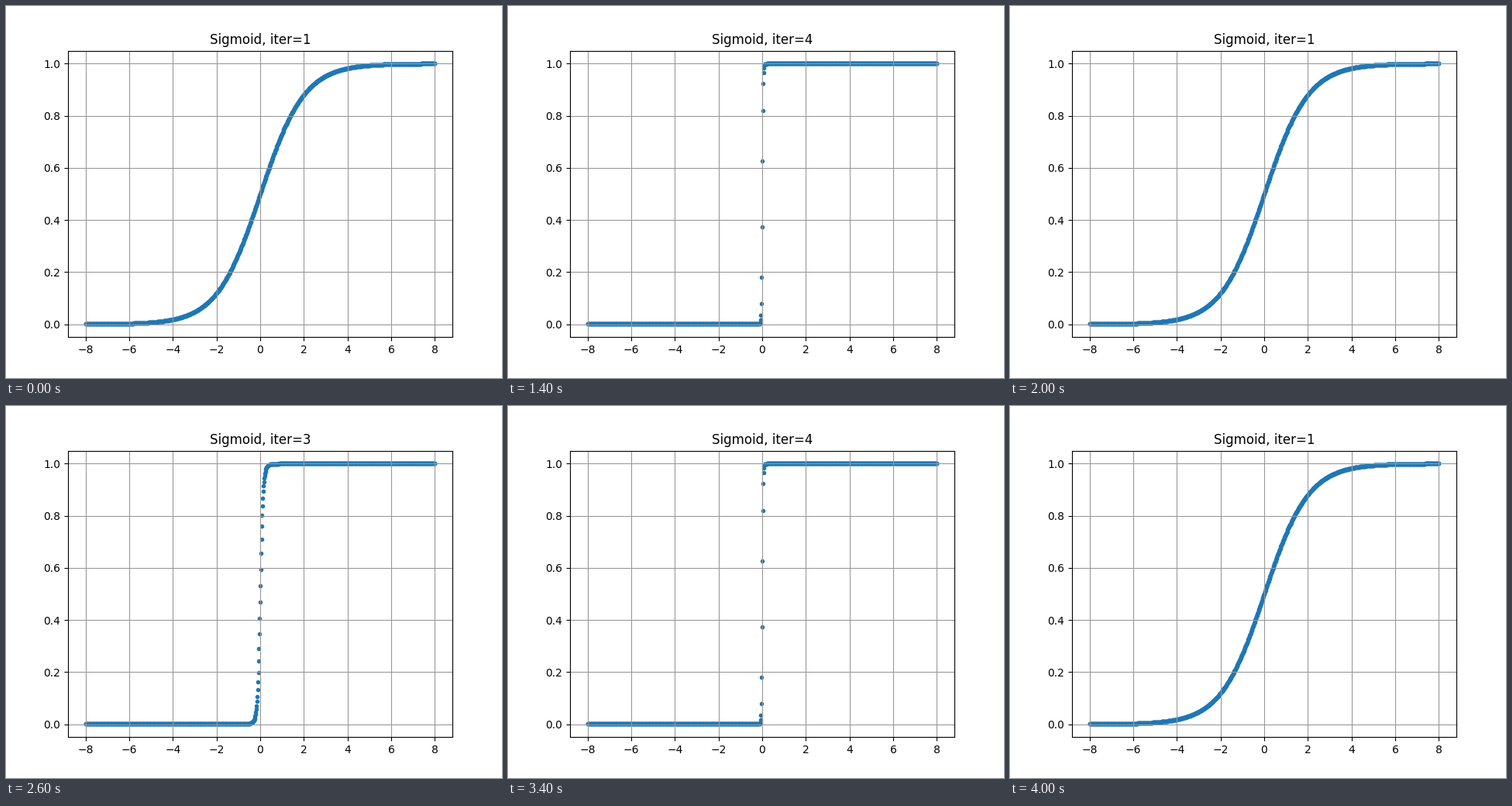
Animation, 640 px wide and 480 px high, one loop 4200 ms. Source, as a matplotlib script:

```python
import matplotlib.pyplot as plt
import numpy as np
from matplotlib.animation import FuncAnimation

SPAN = 8
LEVELS = 5
FRAMES = 21
STEP_MS = 200


def sigmoid(x):
    return 1 / (1 + np.exp(-x))


def iterate(x, count):
    """Apply the sigmoid repeatedly, stretching each result back to the span."""
    y = sigmoid(x)
    for _ in range(count - 1):
        y = sigmoid(2 * SPAN * y - SPAN)
    return y


def level_at(step):
    """Bounce between the first and last level, holding each end twice."""
    phase = step % (2 * LEVELS)
    if phase == 0:
        return 1
    return phase if phase <= LEVELS else 2 * LEVELS + 1 - phase


x = np.linspace(-SPAN, SPAN, 1000)
curves = {n: iterate(x, n) for n in range(1, LEVELS + 1)}

fig, ax = plt.subplots(figsize=(6.4, 4.8), dpi=100)
dots = ax.scatter(x, curves[1], marker=".", color="#1f77b4")
ax.grid(color="#999999")
title = ax.set_title("Sigmoid, iter=1")


def update(step):
    n = level_at(step)
    dots.set_offsets(np.column_stack([x, curves[n]]))
    title.set_text(f"Sigmoid, iter={n}")
    return dots, title


anim = FuncAnimation(fig, update, frames=FRAMES, interval=STEP_MS,
                     repeat=True, repeat_delay=0, blit=False)
plt.show()
```
